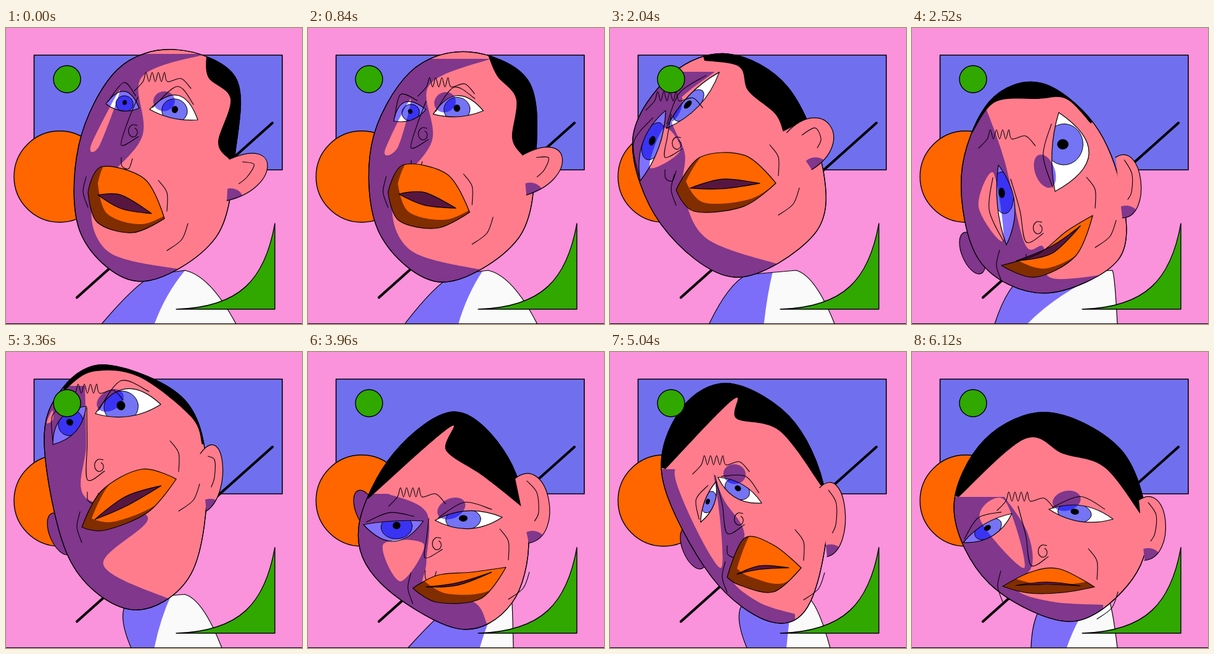
An HTML page with a canvas for the animation above (6240 ms loop, 480 by 480 pixels).

```html
<!DOCTYPE html>
<html>
<head>
<meta charset="utf-8">
<style>
html, body { margin: 0; width: 100%; height: 100%; overflow: hidden; background: #fb92dc; }
canvas { display: block; width: 480px; height: 480px; }
</style>
</head>
<body>
<canvas id="stage" width="480" height="480"></canvas>
<script>
const ctx = document.getElementById('stage').getContext('2d');
const LOOP = 6240, STEP = 120;
const SKIN = '#ff7c8c', ORANGE = '#ff6600', BLUE = '#7070ee', GREEN = '#30a800', SHADE = '#8070ff';
const poses = [];

function addPose(time, parts) {
  poses.push({ time, parts });
}

// Eyes: two corners, upper and lower height, iris position along the axis.
// Torso: foot, shoulder, shoulder, foot, then shadow edge at top and bottom.
addPose(0, {
  head: [275, 35, 372, 80, 372, 200, 340, 340, 217, 411, 122, 335, 118, 190, 180, 68],
  hair: [325, 42, 328, 80, 364, 115, 344, 185, 362, 213],
  shade: [325, 42, 220, 80, 220, 178, 142, 275, 165, 362, 285, 392],
  lit: [185, 100, 152, 190, 138, 190],
  eyeL: [162, 123, 216, 130, 24, 8, .55], eyeR: [233, 132, 311, 149, 32, 6, .5],
  mouth: [133, 266, 155, 225, 225, 245, 257, 309, 205, 332, 148, 315], gap: [11],
  ear: [362, 213, 424, 225, 358, 280], farEar: [150, 250],
  torso: [155, 230, 290, 373, 293, 240], frown: [222, 82], nose: [214, 112, 207, 168]
});
addPose(1560, {
  head: [205, 52, 302, 105, 360, 240, 345, 345, 215, 416, 95, 328, 47, 190, 112, 85],
  hair: [172, 57, 230, 72, 240, 115, 283, 155, 294, 183],
  shade: [188, 80, 110, 140, 130, 205, 125, 270, 165, 350, 290, 398],
  lit: [98, 170, 125, 200, 75, 235],
  eyeL: [54, 253, 100, 140, 18, 9, .55], eyeR: [93, 168, 186, 80, 10, 10, .4],
  mouth: [118, 266, 155, 210, 230, 210, 281, 261, 225, 297, 145, 302], gap: [8],
  ear: [297, 180, 370, 165, 340, 237], farEar: [110, 270],
  torso: [163, 215, 300, 367, 260, 255], frown: [82, 122], nose: [108, 145, 115, 190]
});
addPose(2520, {
  head: [208, 89, 295, 155, 340, 265, 335, 375, 215, 430, 110, 378, 80, 240, 125, 120],
  hair: [98, 170, 135, 120, 205, 115, 250, 115, 290, 155],
  shade: [120, 130, 150, 215, 183, 350, 213, 355, 225, 405, 325, 398],
  lit: [132, 235, 148, 345, 108, 290],
  eyeL: [153, 352, 140, 222, 8, 20, .65], eyeR: [232, 265, 238, 137, 8, 52, .6],
  mouth: [145, 385, 205, 366, 250, 330, 293, 304, 265, 370, 200, 404], gap: [6],
  ear: [330, 210, 371, 248, 341, 308], farEar: [98, 365],
  torso: [134, 175, 325, 333, 325, 185], frown: [122, 175], nose: [160, 245, 205, 325]
});
addPose(2920, {
  head: [165, 21, 290, 78, 326, 200, 300, 360, 205, 418, 105, 340, 62, 150, 92, 58],
  hair: [95, 62, 140, 32, 215, 40, 300, 105, 318, 150],
  shade: [128, 55, 130, 150, 128, 235, 230, 268, 158, 345, 268, 402],
  lit: [75, 95, 76, 110, 66, 115],
  eyeL: [76, 150, 130, 88, 18, 14, .55], eyeR: [145, 100, 251, 85, 33, 12, .4],
  mouth: [123, 284, 155, 225, 220, 190, 276, 206, 230, 260, 160, 289], gap: [8],
  ear: [315, 165, 351, 180, 325, 258], farEar: [88, 295],
  torso: [203, 195, 290, 350, 270, 240], frown: [112, 62], nose: [131, 90, 152, 185]
});
addPose(3360, poses[3].parts);
addPose(3960, {
  head: [240, 97, 325, 172, 358, 300, 330, 408, 245, 449, 118, 375, 82, 285, 140, 163],
  hair: [98, 238, 230, 122, 224, 160, 285, 202, 354, 257],
  shade: [130, 230, 192, 260, 192, 340, 190, 388, 268, 405, 290, 440],
  lit: [122, 312, 188, 312, 150, 372],
  eyeL: [90, 280, 187, 274, 3, 30, .55], eyeR: [206, 273, 315, 268, 13, 16, .42],
  mouth: [170, 383, 210, 362, 265, 357, 321, 349, 280, 400, 210, 406], gap: [2],
  ear: [336, 205, 390, 238, 358, 310], farEar: [95, 258],
  torso: [162, 240, 330, 333, 318, 278], frown: [145, 230], nose: [196, 270, 210, 312]
});
addPose(5040, {
  head: [195, 51, 300, 115, 352, 250, 325, 405, 262, 438, 165, 365, 85, 205, 115, 93],
  hair: [90, 190, 200, 77, 205, 108, 275, 128, 343, 218],
  shade: [165, 190, 185, 240, 218, 295, 195, 362, 240, 405, 300, 425],
  lit: [160, 170, 180, 350, 105, 200],
  eyeL: [147, 276, 172, 210, 6, 10, .5], eyeR: [175, 203, 246, 245, 10, 14, .45],
  mouth: [190, 365, 218, 302, 265, 313, 310, 350, 265, 389, 210, 378], gap: [3],
  ear: [340, 220, 381, 255, 352, 332], farEar: [135, 318],
  torso: [222, 215, 315, 357, 298, 286], frown: [148, 178], nose: [170, 200, 210, 272]
});
addPose(6120, {
  head: [222, 98, 340, 160, 382, 285, 350, 378, 255, 437, 125, 375, 68, 255, 118, 142],
  hair: [76, 235, 183, 141, 245, 165, 312, 187, 370, 262],
  shade: [150, 235, 186, 290, 195, 345, 170, 385, 228, 405, 310, 410],
  lit: [150, 240, 182, 350, 110, 270],
  eyeL: [83, 309, 162, 262, 8, 15, .5], eyeR: [222, 255, 326, 271, 14, 12, .4],
  mouth: [147, 380, 195, 356, 240, 352, 296, 381, 245, 390, 190, 391], gap: [2],
  ear: [368, 240, 411, 275, 377, 338], farEar: [110, 310],
  torso: [193, 215, 315, 333, 300, 250], frown: [152, 237], nose: [172, 250, 213, 324]
});

const lerp = (a, b, u) => a + (b - a) * u;
const between = (p, q, u) => p.map((v, i) => lerp(v, q[i], u));
const pairs = flat => flat.flatMap((v, i) => i % 2 ? [] : [[v, flat[i + 1]]]);
const center = pts => [0, 1].map(k => pts.reduce((sum, p) => sum + p[k], 0) / pts.length);

// The first turn starts late; the second waits before it swings.
function ease(u, leg) {
  if (leg === 0) return u < .46 ? .17 * u : lerp(.08, 1, (u - .46) / .54);
  if (leg === 1) return u < .62 ? .16 * u : lerp(.1, 1, (u - .62) / .38);
  return u;
}

function poseAt(time) {
  let leg = 0;
  while (leg < poses.length - 2 && time >= poses[leg + 1].time) leg++;
  const from = poses[leg], to = poses[leg + 1], mixed = {};
  const u = ease((time - from.time) / (to.time - from.time), leg);
  for (const key in from.parts) mixed[key] = between(from.parts[key], to.parts[key], u);
  return mixed;
}

// Smooth curve through the points; sharp points get no tangent.
function curve(pts, closed = true, sharp = [], path = new Path2D()) {
  const n = pts.length;
  const at = i => closed ? pts[(i + n) % n] : pts[Math.max(0, Math.min(n - 1, i))];
  const handle = (i, dir) => {
    const a = at(i - 1), b = at(i + 1), k = sharp.includes(i % n) ? 0 : dir / 6;
    return at(i).map((v, axis) => v + (b[axis] - a[axis]) * k);
  };
  path.moveTo(...at(0));
  for (let i = 0; i < (closed ? n : n - 1); i++) {
    path.bezierCurveTo(...handle(i, 1), ...handle(i + 1, -1), ...at(i + 1));
  }
  return path;
}

function edged(pts, rest) {
  const path = curve(pts, false);
  rest.forEach(p => path.lineTo(...p));
  path.closePath();
  return path;
}

function oval(x, y, rx, ry, angle = 0) {
  const path = new Path2D();
  path.ellipse(x, y, rx, ry, angle, 0, 2 * Math.PI);
  return path;
}

function outside(shape) {
  const path = new Path2D('M-90 -90H570V570H-90Z');
  path.addPath(shape);
  return path;
}

function paint(path, fill, width = 1.2) {
  if (fill) { ctx.fillStyle = fill; ctx.fill(path); }
  if (width) { ctx.lineWidth = width; ctx.stroke(path); }
}

const line = (...pts) => paint(curve(pts, false), null, 1.1);

function within(clip, draw, rule = 'nonzero') {
  ctx.save();
  ctx.clip(clip, rule);
  draw();
  ctx.restore();
}

function shadow(path) {
  ctx.globalCompositeOperation = 'multiply';
  paint(path, SHADE, 0);
  ctx.globalCompositeOperation = 'source-over';
}

function drawBackdrop() {
  ctx.fillStyle = '#fb92dc';
  ctx.fillRect(0, 0, 480, 480);
  paint(new Path2D('M45.5 44H448V230H45.5Z'), BLUE, 1.6);
  paint(oval(87, 241, 74, 74), ORANGE, 1.4);
  paint(new Path2D('M115 437L432 154'), null, 4.2);
}

function drawTorso([footL, left, right, footR, edgeTop, edgeFoot]) {
  const torso = new Path2D(`M${footL} 480Q${left - 20} 415 ${left + 10} 400L${right} 393Q${lerp(right, footR, .5)} 402 ${footR} 480`);
  paint(torso, '#fafafa', 0);
  const edge = `Q${lerp(edgeTop, edgeFoot, .65)} 430 ${edgeFoot} 482`;
  within(torso, () => shadow(new Path2D(`M80 370H${edgeTop}V390${edge}H80Z`)));
  paint(torso);
}

// Point at a share of the eye's axis, lifted towards the brow.
function eyeFrame([x0, y0, x1, y1]) {
  const dx = x1 - x0, dy = y1 - y0, size = Math.hypot(dx, dy);
  const at = (u, lift) => [x0 + dx * u + dy / size * lift, y0 + dy * u - dx / size * lift];
  return { at, size, angle: Math.atan2(dy, dx) };
}

function drawEye(eye) {
  const { at, size, angle } = eyeFrame(eye);
  const [upper, lower, look] = eye.slice(4);
  const shape = new Path2D();
  shape.moveTo(...at(0, 0));
  shape.quadraticCurveTo(...at(.5, 2 * upper), ...at(1, 0));
  shape.quadraticCurveTo(...at(.5, -2 * lower), ...at(0, 0));
  const across = Math.min((upper + lower) / 2 + 3, size * .24);
  const lift = (upper - lower) * .25;
  paint(shape, '#fff', 0);
  within(shape, () => {
    paint(oval(...at(look, lift), size * .26, across, angle), '#7474f4', 1);
    paint(oval(...at(look, lift + 2), size * .065, across * .3, angle), '#000', 0);
  });
  paint(shape);
}

function drawLid(eye) {
  const { at } = eyeFrame(eye), lift = eye[4] + 14;
  line(at(.05, 4), at(.45, lift), at(.85, lift * .5));
}

function drawMouth(mouth, [open]) {
  const pts = pairs(mouth), shape = curve(pts, true, [0, 3]), mid = center(pts);
  const band = new Path2D();
  band.addPath(shape, new DOMMatrix([1, 0, 0, 1, 16, -14]));
  paint(shape, ORANGE, 0);
  within(shape, () => within(outside(band), () => shadow(shape), 'evenodd'));
  const a = between(pts[0], mid, .3), b = between(pts[3], mid, .3);
  const rim = side => [mid[0], mid[1] + side * open];
  paint(curve([a, rim(-1), b, rim(1)], true, [0, 2]), '#561640');
  paint(shape);
  const [x, y] = pts[3], [u, v] = pts[0];
  line([x - 10, y - 62], [x + 4, y - 42], [x + 4, y - 12]);
  line([x + 4, y + 52], [x + 28, y + 34], [x + 38, y + 8]);
  line([u - 3, v - 25], [u - 8, v], [u, v + 25]);
}

function drawNose([bx, by, x, y]) {
  line([bx, by], [lerp(bx, x - 20, .6), lerp(by, y + 22, .5)], [x - 20, y + 22], [x + 8, y + 8]);
  const swirl = Array.from({ length: 9 }, (_, i) => {
    const a = 1 + i * .8, r = 10 - i * .6;
    return [x + r * Math.cos(a), y - r * 1.2 * Math.sin(a)];
  });
  line(...swirl);
  line([x - 20, y + 42], [x - 19, y + 56], [x - 8, y + 60], [x - 2, y + 44]);
}

function drawFrown([x, y]) {
  const folds = Array.from({ length: 9 }, (_, i) => [x + i * 5, y + (i % 2 ? -10 : 5)]);
  line([x - 14, y + 20], ...folds, [x + 62, y], [x + 78, y + 16]);
}

function drawEar([x0, y0, ax, ay, x1, y1]) {
  const mx = (8 * ax - x0 - x1) / 6, my = (8 * ay - y0 - y1) / 6;
  const sx = (x0 - x1) * .65, sy = (y0 - y1) * .65;
  const ear = new Path2D(`M${x0} ${y0}C${mx + sx} ${my + sy} ${mx - sx} ${my - sy} ${x1} ${y1}`);
  paint(ear, SKIN);
  within(ear, () => shadow(oval(x1 + 6, y1 - 4, 20, 16)));
  line([lerp(x0, ax, .35), y0 + 4], [lerp(x0, ax, .65), lerp(y0, ay, .7)],
    [lerp(x1, ax, .5), lerp(ay, y1, .3)], [lerp(x1, ax, .3), lerp(ay, y1, .5)]);
}

function drawHead(p) {
  paint(oval(...p.farEar, 17, 36, -.4), '#80368c');
  const headPts = pairs(p.head), head = curve(headPts), mid = center(headPts);
  const edge = pairs(p.shade), last = edge[edge.length - 1];
  const shade = edged(edge, [[last[0], 520], [-60, 520], [-60, edge[0][1]]]);
  const { at, size, angle } = eyeFrame(p.eyeR);
  const socket = oval(...at(.25, 18), size * .22, 16, angle - .4);
  const hairline = pairs(p.hair), outer = [4, 2, 0].map(i => between(mid, hairline[i], 3));

  paint(head, SKIN);
  within(head, () => {
    drawEye(p.eyeL);
    drawEye(p.eyeR);
    within(outside(curve(pairs(p.lit))), () => shadow(shade), 'evenodd');
    within(outside(shade), () => shadow(socket), 'evenodd');
    paint(edged(hairline, outer), '#000', 0);
  });
  paint(head);
  drawEar(p.ear);
  drawNose(p.nose);
  drawMouth(p.mouth, p.gap);
  drawLid(p.eyeL);
  drawLid(p.eyeR);
  drawFrown(p.frown);
}

function drawFront() {
  paint(oval(99, 83, 22, 22), GREEN, 1.4);
  paint(new Path2D('M436 317C420 407 380 453 276 456H436Z'), GREEN, 1.4);
  paint(new Path2D('M0 479.5H480'), null, 1);
}

function draw(time) {
  const p = poseAt(time);
  const sway = 13 * Math.sin(Math.PI * Math.max(0, Math.min(1, (time - 1560) / 900)));
  ctx.strokeStyle = '#000';
  ctx.lineJoin = ctx.lineCap = 'round';
  drawBackdrop();
  drawTorso(p.torso);
  ctx.save();
  ctx.translate(-sway, -sway);
  drawHead(p);
  ctx.restore();
  drawFront();
}

const start = performance.now();
function tick() {
  const elapsed = (performance.now() - start) % LOOP;
  draw(Math.floor(elapsed / STEP) * STEP);
  requestAnimationFrame(tick);
}
tick();
</script>
</body>
</html>
```
